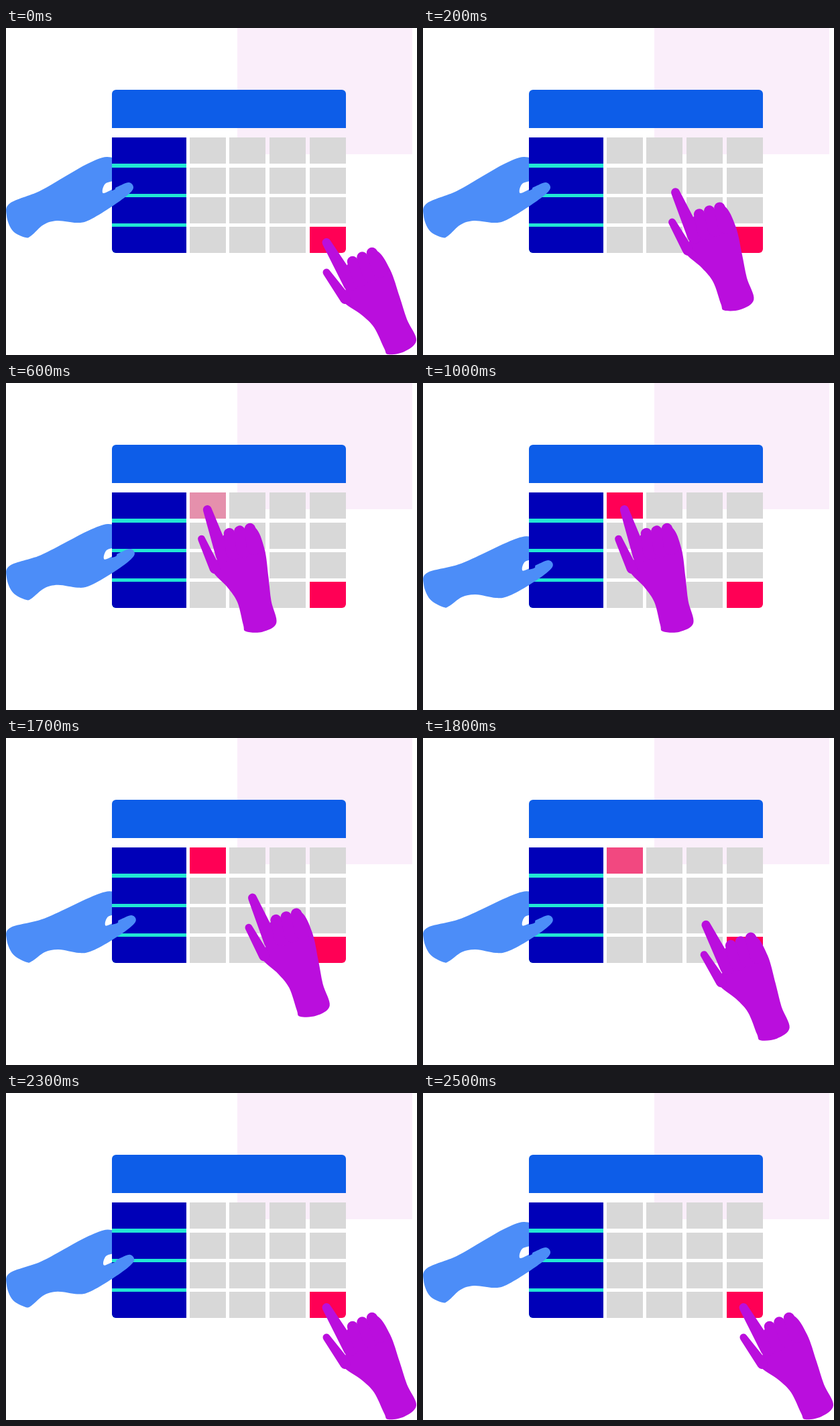
An HTML page with a canvas for the animation above (3100 ms loop, 613 by 487 pixels).

```html
<!DOCTYPE html>
<html lang="en">
<head>
<meta charset="utf-8">
<title>Calendar hands</title>
<style>
html, body { margin: 0; width: 100%; height: 100%; overflow: hidden; background: #fff; }
canvas { display: block; width: 613px; height: 487px; }
</style>
</head>
<body>
<canvas id="stage" width="613" height="487"></canvas>
<script>
const ctx = document.getElementById('stage').getContext('2d');
const W = 613, H = 487, LOOP = 3100, STEP = 100;
const BLUE = '#4c8df8', PURPLE = '#ba0edd', RED = '#ff0055', GRAY = '#d8d8d8';
const TABLE_X = 158, CELL_W = 54, CELL_H = 39;
const colX = i => Math.floor(274 + i * 59.7);
const rowY = i => Math.ceil(163 + i * 44.33);

// Key points of the left hand; the thumb starts at index THUMB
const holder = [
  [6, 261], [50, 243], [90, 220], [122, 202], [150, 192], [168, 200], [166, 224], [148, 232],
  [145, 246], [165, 237], [183, 230], [190, 238], [180, 250], [150, 271], [122, 287],
  [105, 290], [76, 287], [56, 293], [38, 309], [29, 312], [10, 302], [1, 280]];
const THUMB = 8;

// Key points of the right palm and wrist
const palm = [
  [508, 354], [530, 344], [553, 332], [573, 360], [587, 400], [598, 434], [612, 465],
  [594, 482], [570, 486], [564, 477], [549, 446], [530, 427], [503, 407], [507, 387]];
const TIP = [477, 316], AWAY = [-177, -131], TURN = 0.197;

const clamp = x => Math.min(1, Math.max(0, x));
const linear = x => x;

// cubic-bezier(0, 0, .58, 1)
function easeOut(x) {
  let lo = 0, hi = 1;
  for (let i = 0; i < 20; i++) {
    const s = (lo + hi) / 2;
    if (1.74 * (1 - s) * s * s + s * s * s < x) lo = s; else hi = s;
  }
  return lo * lo * (3 - 2 * lo);
}

// Goes 0 to 1 over [a, b], then back over [c, d]
function thereAndBack(t, a, b, c, d, ease) {
  return ease(clamp((t - a) / (b - a))) * (1 - ease(clamp((t - c) / (d - c))));
}

function fillSpline(p, color) {
  const n = p.length, at = i => p[(i + n) % n];
  ctx.beginPath();
  ctx.moveTo(...p[0]);
  for (let i = 0; i < n; i++) {
    const [a, b, c, d] = [at(i - 1), at(i), at(i + 1), at(i + 2)];
    ctx.bezierCurveTo(
      b[0] + (c[0] - a[0]) / 6, b[1] + (c[1] - a[1]) / 6,
      c[0] - (d[0] - b[0]) / 6, c[1] - (d[1] - b[1]) / 6, c[0], c[1]);
  }
  ctx.fillStyle = color;
  ctx.fill();
}

// Tapered finger with round ends
function finger(x1, y1, r1, x2, y2, r2, color) {
  const a = Math.atan2(y2 - y1, x2 - x1), q = Math.PI / 2;
  ctx.beginPath();
  ctx.arc(x1, y1, r1, a + q, a + 3 * q);
  ctx.arc(x2, y2, r2, a - q, a + q);
  ctx.fillStyle = color;
  ctx.fill();
}

function box(x, y, w, h, color, radii = 0) {
  ctx.fillStyle = color;
  ctx.beginPath();
  ctx.roundRect(x, y, w, h, radii);
  ctx.fill();
}

function drawBackdrop() {
  box(0, 0, W, H, '#fff');
  box(345, 0, 261, 188, '#faeefa');
}

function drawTable(mark) {
  box(TABLE_X, 92, 349, 57, '#0d5de8', [6, 6, 0, 0]);
  box(TABLE_X, 163, 111, 172, '#22e6d4', [0, 0, 0, 6]);
  for (let r = 0; r < 4; r++) {
    const round = r === 3 ? 6 : 0;
    box(TABLE_X, rowY(r), 111, CELL_H, '#0000b8', [0, 0, 0, round]);
    for (let c = 0; c < 4; c++) {
      const corner = round && c === 3;
      box(colX(c), rowY(r), CELL_W, CELL_H, corner ? RED : GRAY, [0, 0, corner ? round : 0, 0]);
    }
  }
  ctx.globalAlpha = mark;
  box(colX(0), rowY(0), CELL_W, CELL_H, RED);
  ctx.globalAlpha = 1;
}

// The hand sinks, its far end more than the wrist
function lower([x, y], k) {
  const bend = Math.sin(x / 100);
  return [x + 4 * bend * k, y + (21.5 + 12 * bend + (250 - y) * 0.05) * k];
}

function drawPointer(k) {
  ctx.save();
  ctx.translate(TIP[0] + AWAY[0] * k, TIP[1] + AWAY[1] * k);
  ctx.rotate(TURN * k);
  ctx.translate(-TIP[0], -TIP[1]);
  fillSpline(palm, PURPLE);
  finger(478, 319.5, 6.5, 514, 381, 11, PURPLE);
  finger(478, 364, 5.5, 506, 403, 8, PURPLE);
  for (let i = 0; i < 3; i++) {
    const x = 517 + i * 14.5, y = 348 - i * 6.5;
    finger(x, y, 8.3, x + 12, y + 25, 12, PURPLE);
  }
  ctx.restore();
}

function draw(t) {
  const reach = thereAndBack(t, 0, 500, 1600, 2000, easeOut);
  const dip = thereAndBack(t, 430, 930, 2100, 2500, easeOut);
  const mark = thereAndBack(t, 500, 800, 1700, 2000, linear);
  const hand = holder.map(p => lower(p, dip));

  drawBackdrop();
  fillSpline(hand, BLUE);
  drawTable(mark);

  // The thumb lies over the table
  ctx.save();
  ctx.beginPath();
  ctx.rect(TABLE_X, 0, W, H);
  ctx.clip();
  fillSpline(hand.slice(THUMB), BLUE);
  ctx.restore();

  drawPointer(reach);
}

const start = performance.now();
function tick() {
  const t = (performance.now() - start) % LOOP;
  draw(Math.floor(t / STEP) * STEP);
  requestAnimationFrame(tick);
}
tick();
</script>
</body>
</html>
```
